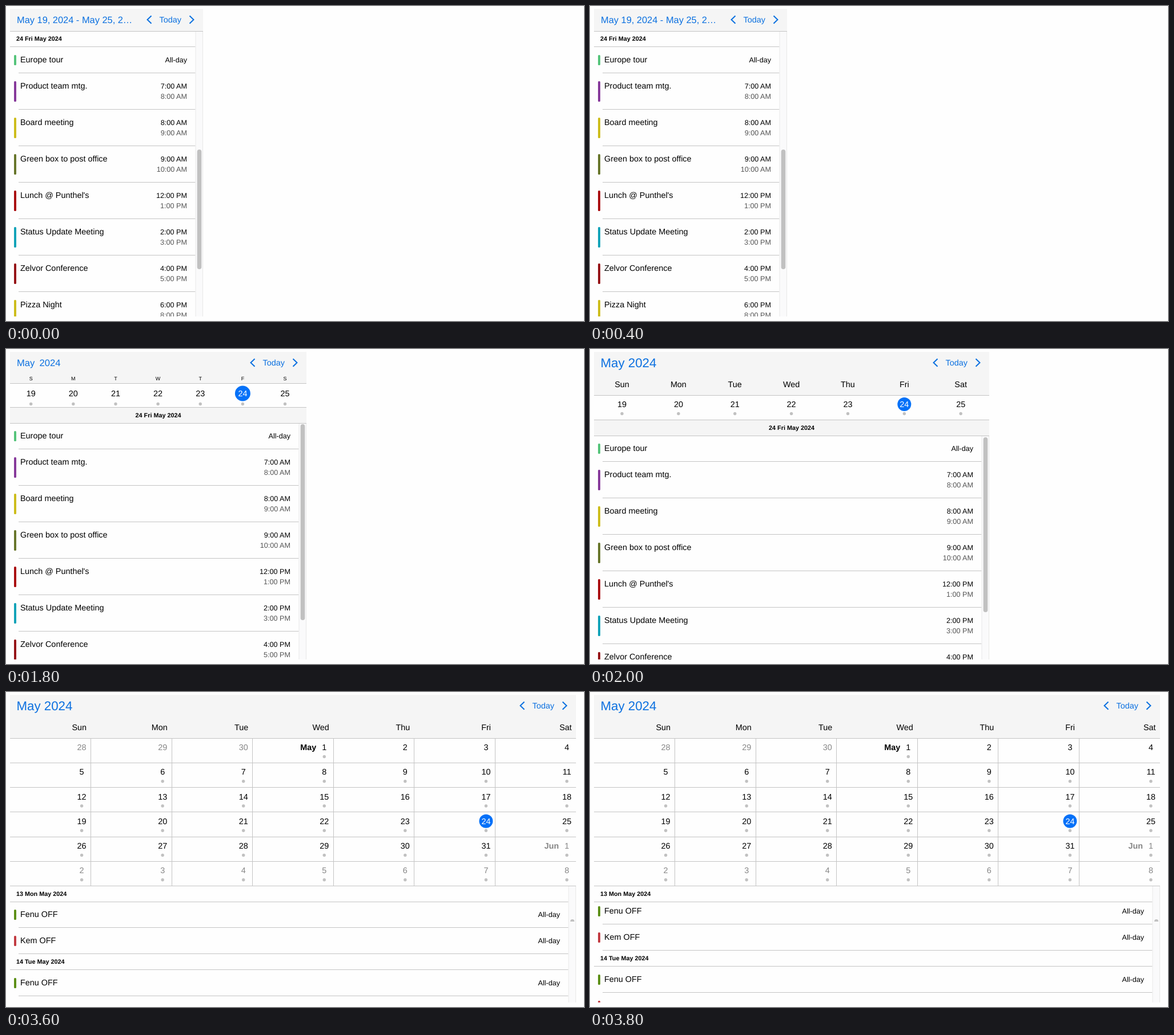
An HTML page that plays this animation: 1012x553 px, repeating every 4000 ms.

```html
<!DOCTYPE html>
<html lang="en">
<head>
<meta charset="utf-8">
<title>Responsive calendar</title>
<style>
html, body { margin: 0; width: 100%; height: 100%; overflow: hidden; background: #fefefe; }
svg { display: block; font: 14.4px "Liberation Sans", Arial, sans-serif; text-rendering: geometricPrecision; }
</style>
</head>
<body>
<svg id="stage" width="1012" height="553" viewBox="0 0 1012 553"></svg>
<script>
const LEFT = 7, BOTTOM = 545;
const PAPER = '#fefefe', BAR = '#f5f5f5', LINE = '#c4c4c4', BLUE = '#0b70e0', DOT = '#c1c1c1';
const WEEK = ['Sun', 'Mon', 'Tue', 'Wed', 'Thu', 'Fri', 'Sat'];
const TODAY = 24;

const agenda = [
  ['Europe tour', '#56c47b'],
  ['Product team mtg.', '#873a9b', '7:00 AM', '8:00 AM'],
  ['Board meeting', '#cdbd1c', '8:00 AM', '9:00 AM'],
  ['Green box to post office', '#68762b', '9:00 AM', '10:00 AM'],
  ["Lunch @ Punthel's", '#aa0c10', '12:00 PM', '1:00 PM'],
  ['Status Update Meeting', '#12a3b9', '2:00 PM', '3:00 PM'],
  ['Zelvor Conference', '#961519', '4:00 PM', '5:00 PM'],
  ['Pizza Night', '#cdbd1c', '6:00 PM', '8:00 PM']
];
const daysOff = [['Fenu OFF', '#5d9018'], ['Kem OFF', '#c23c42']];

const rect = (x, y, w, h, fill, r = 0) =>
  `<rect x="${x}" y="${y}" width="${w}" height="${h}" rx="${r}" fill="${fill}"/>`;
const hLine = (x, y, right, fill = LINE) => rect(x, Math.round(y), right - x, 1, fill);
const circle = (x, y, r, fill) => `<circle cx="${x}" cy="${y}" r="${r}" fill="${fill}"/>`;
const text = (x, y, str, { size = 14.4, fill = '#000', anchor = 'start', weight = 400 } = {}) =>
  `<text x="${x}" y="${y}" font-size="${size}" fill="${fill}" text-anchor="${anchor}" font-weight="${weight}">${str}</text>`;
const chevron = (x, dir) =>
  `<path d="M${x} 17.2l${7 * dir} 6.8l${-7 * dir} 6.8" fill="none" stroke="${BLUE}" stroke-width="2"/>`;

function header(right, height, title) {
  return rect(LEFT, 5, right - LEFT, height - 5, BAR) + title + hLine(LEFT, height, right) +
    chevron(right - 90.5, -1) + chevron(right - 23.5, 1) +
    text(right - 38, 29, 'Today', { fill: BLUE, anchor: 'end' });
}

const bigTitle = text(18.5, 32, 'May 2024', { size: 22.3, fill: BLUE });

function dayNumber(x, y, day, radius, { dot = true, fill = '#000', dotY = y + 16.5 } = {}) {
  const selected = day === TODAY;
  return (dot ? circle(x, dotY, 2.7, DOT) : '') +
    (selected ? circle(x, y, radius, '#0571f8') : '') +
    text(x, y + 5.1, day, { fill: selected ? '#fff' : fill, anchor: 'middle' });
}

function eventRows(items, top, right) {
  let out = '';
  for (const [name, color, from, to] of items) {
    const height = from ? 64 : 46;
    const end = { size: 12.6, anchor: 'end' };
    out += rect(14, top + 14.5, 4, height - 28, color, 1.6) +
      text(25, top + 27.7, name) +
      text(right - 28, top + 27.7, from || 'All-day', end) +
      (to ? text(right - 28, top + 45.7, to, { ...end, fill: '#555' }) : '') +
      hLine(22, top + height - 0.5, right - 13.5);
    top += height;
  }
  return out;
}

function dateHeading(top, right, label) {
  return rect(LEFT, top, right - 13.5 - LEFT, 27, PAPER) +
    text(18, top + 16.6, label, { size: 10.8, weight: 700 }) +
    hLine(LEFT, top + 27, right - 13.5);
}

function scrollbar(right, top, thumbTop, thumbHeight) {
  return rect(right - 13.5, top, 13.5, BOTTOM - top, '#e8e8e8') +
    rect(right - 12.5, top, 11.5, BOTTOM - top, '#fafafb') +
    (thumbHeight ? rect(right - 10.3, thumbTop, 7.6, thumbHeight, DOT, 3.8)
      : `<path d="M${right - 10} ${thumbTop + 4}q0 -4 3.6 -4t3.6 4z" fill="${DOT}"/>`);
}

function centredBar(right, top, height) {
  return rect(LEFT, top, right - LEFT, height, BAR) +
    hLine(LEFT, top, right) + hLine(LEFT, top + height, right) +
    text((LEFT + right) / 2, top + 18, '24 Fri May 2024', { size: 10.8, weight: 700, anchor: 'middle' });
}

function phone() {
  const right = 345;
  return eventRows(agenda, 71.5, right) + dateHeading(44, right, '24 Fri May 2024') +
    scrollbar(right, 44, 252, 210) +
    header(right, 44, text(19, 30, 'May 19, 2024 - May 25, 2…', { size: 16.4, fill: BLUE }));
}

// One-week strip above the agenda, in a narrow or a wide layout.
function weekView(right, wide) {
  const step = (right - LEFT) / 7;
  const headerEnd = wide ? 81 : 60, barTop = wide ? 124 : 102;
  const title = wide ? bigTitle
    : text(19, 30, 'May', { size: 16.6, fill: BLUE }) + text(58.5, 30, '2024', { size: 16.6, fill: BLUE });
  const strip = WEEK.map((name, i) => {
    const x = 6.6 + step * (i + 0.5);
    const label = wide ? text(x, 66.8, name, { anchor: 'middle' })
      : text(x, 54.8, name[0], { size: 9, anchor: 'middle' });
    return label + dayNumber(x, wide ? 97 : 78, 19 + i, wide ? 12 : 13.5, { dotY: wide ? 113.5 : 96.5 });
  }).join('');
  return eventRows(agenda, wide ? 151.5 : 129.5, right) +
    scrollbar(right, barTop + 28, wide ? 155 : 132, wide ? 307 : 344) +
    header(right, headerEnd, title) + strip + centredBar(right, barTop, 28);
}

function monthView(list) {
  const right = 998, colWidth = (right - LEFT) / 7, rowHeight = 43.25;
  let out = list(right) + header(right, 81, bigTitle);
  WEEK.forEach((name, i) => {
    const edge = LEFT + colWidth * (i + 1);
    out += text(edge - 7.5, 66.8, name, { anchor: 'end' });
    if (i < 6) out += rect(Math.round(edge - 0.5), 82, 1, 259, LINE);
  });
  for (let cell = 0; cell < 42; cell++) {
    const n = cell - 2, day = n < 1 ? n + 30 : n > 31 ? n - 31 : n;
    const fill = n < 1 || n > 31 ? '#868686' : '#000';
    const x = LEFT + colWidth * (cell % 7 + 1) - 16;
    const y = 81.5 + rowHeight * Math.floor(cell / 7) + 15.5;
    out += dayNumber(x, y, day, 12, { fill, dot: n > 0 && ![2, 3, 4, 5, 16].includes(n) });
    if (day === 1) out += text(x - 14, y + 5.1, n === 1 ? 'May' : 'Jun', { fill, anchor: 'end', weight: 700 });
  }
  for (let row = 1; row <= 6; row++) out += hLine(LEFT, 81 + rowHeight * row - 0.3, right);
  return out;
}

const selectedDay = right => eventRows(agenda, 367.5, right) +
  dateHeading(341, right, '24 Fri May 2024') + scrollbar(right, 341, 343, 75);

const scrolledList = offset => right => {
  const top = 367.5 - offset;
  return eventRows(daysOff, top, right) +
    eventRows(daysOff, top + 120, right) +
    dateHeading(top + 92.5, right, '14 Tue May 2024') +
    dateHeading(341, right, '13 Mon May 2024') + scrollbar(right, 341, 399);
};

const scenes = [
  [0, phone()],
  [1000, weekView(526, false)],
  [2000, weekView(699, true)],
  [3000, monthView(selectedDay)],
  [3600, monthView(scrolledList(0))],
  [3800, monthView(scrolledList(6))]
];

const stage = document.getElementById('stage');
stage.innerHTML = `<clipPath id="panel"><rect width="1012" height="${BOTTOM}"/></clipPath>` +
  scenes.map(([, art]) => `<g class="scene" clip-path="url(#panel)">${art}</g>`).join('');
const groups = [...stage.querySelectorAll('.scene')];

function draw() {
  const time = performance.now() % 4000;
  const current = scenes.findLastIndex(([start]) => time >= start);
  groups.forEach((group, i) => { group.style.display = i === current ? '' : 'none'; });
  requestAnimationFrame(draw);
}
draw();
</script>
</body>
</html>
```
